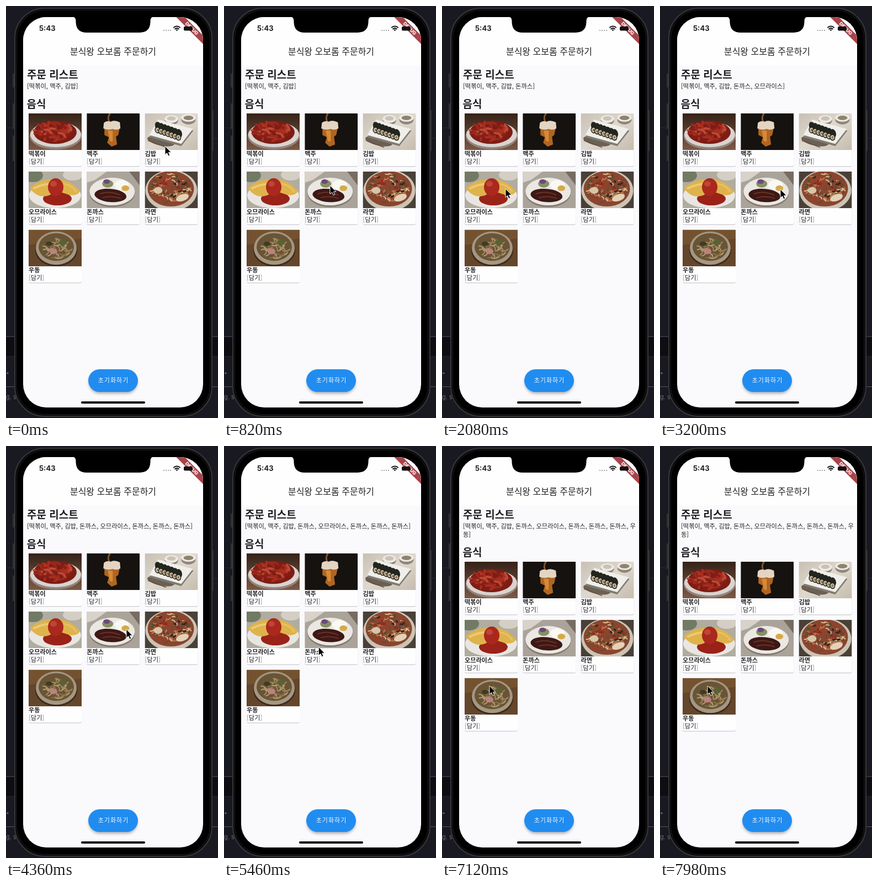
Recreate the animation shown at these times as an HTML page. Size 384 by 744 pixels, loop 8 s.

```html
<!DOCTYPE html>
<html lang="ko">
<head>
<meta charset="utf-8">
<title>주문하기</title>
<style>
  html, body { margin: 0; width: 100%; height: 100%; overflow: hidden; background: #191922; }
  svg { display: block; width: 100vw; height: 100vh; }
  text { font-family: "Noto Sans CJK KR", "Noto Sans CJK", "Noto Sans CJK JP", sans-serif; fill: #202024; white-space: pre; }
  .latin { font-family: Inter, Roboto, sans-serif; }
  .heading { font-size: 19px; font-weight: 700; }
  .body { font-size: 11.25px; }
  .name { font-size: 11.1px; font-weight: 700; }
  .bracket { fill: #8c8c90; }
</style>
</head>
<body>
<svg viewBox="0 0 384 744">
  <defs>
    <clipPath id="screen"><rect x="31" y="20" width="326" height="705" rx="42"/></clipPath>
    <clipPath id="photo"><rect width="96" height="66"/></clipPath>
    <filter id="soft" x="-30%" y="-30%" width="160%" height="180%"><feGaussianBlur stdDeviation="2.5"/></filter>
    <linearGradient id="linen" x2="1" y2="1"><stop stop-color="#c9c0b4"/><stop offset=".5" stop-color="#ded8ce"/><stop offset="1" stop-color="#c5bcad"/></linearGradient>
    <linearGradient id="wood" x2="0" y2="1"><stop stop-color="#352218"/><stop offset="1" stop-color="#7c5945"/></linearGradient>
  </defs>

  <!-- window behind the phone -->
  <rect width="384" height="744" fill="#191922"/>
  <path d="M0 597H384V633H0Z" fill="#0d0d12"/>
  <path d="M0 597H384M0 687.5H384" stroke="#55556c"/>
  <path d="M0 220H16M372 239H384M0 633H384" stroke="#2b2b38"/>
  <circle cx="3" cy="663" r="1.5" fill="#777785"/>
  <text class="latin" x="0" y="710" font-size="11" style="fill:#6b6b78">g. s</text>

  <!-- phone body -->
  <path d="M13.5 122V147M13.5 176V222M13.5 234V280M374.5 188V262" stroke="#303036" stroke-width="3"/>
  <rect x="16" y="4" width="357" height="737" rx="54" fill="#0a0a0b" stroke="#37373a" stroke-width="2"/>
  <rect x="19.5" y="7.5" width="350" height="730" rx="51" fill="#000" stroke="#1b1b1d"/>

  <g clip-path="url(#screen)">
    <path d="M31 20H357V725H31Z" fill="#fafafd"/>
    <path d="M31 20H357V107H31Z" fill="#fefeff"/>
    <text x="194" y="88" font-size="16" text-anchor="middle">분식왕 오보롬 주문하기</text>
    <text x="38" y="131" class="heading">주문 리스트</text>
    <text id="line1" x="38" y="148.5" class="body"></text>
    <text id="line2" x="38" y="163.5" class="body"></text>
    <g id="menu"><text x="37.5" y="184" class="heading">음식</text></g>

    <rect x="150" y="660" width="88" height="40" rx="20" fill="#555" opacity=".45" filter="url(#soft)"/>
    <rect x="149" y="656" width="90" height="41" rx="20.5" fill="#218cf0"/>
    <text x="194.5" y="680" font-size="11" letter-spacing="1" text-anchor="middle" style="fill:#f4f9ff">초기화하기</text>

    <g transform="translate(336.5 40.5) rotate(45)">
      <path d="M-40 -5.5H40V5.5H-40Z" fill="#a8434a"/>
      <text class="latin" y="3" font-size="8.5" font-weight="800" text-anchor="middle" style="fill:#fff">DEBUG</text>
    </g>
  </g>

  <!-- system chrome -->
  <path d="M120 19Q126.500 20 126.500 27V29Q127 48 146 48H242Q261 48 261.500 29V27Q261.500 20 268 19Z"/>
  <text class="latin" x="60" y="45.300" font-size="13" font-weight="700">5:43</text>
  <path d="M285 44H299" stroke="#a8a8ac" stroke-width="2" stroke-dasharray="2 2"/>
  <g fill="none" stroke="#111" stroke-width="2">
    <path d="M303.300 39.300Q309.500 33.800 315.700 39.300M305.600 41.900Q309.500 38.400 313.400 41.900"/>
    <path d="M308 43L309.500 44.800L311 43Z" fill="#111" stroke-width="1"/>
  </g>
  <rect x="322" y="37" width="16" height="7.500" rx="2" fill="#111"/>
  <rect x="136" y="714" width="116" height="4" rx="2"/>
  <path id="cursor" d="M0 0V15.500L3.600 12.300L6 17.800L8.700 16.600L6.300 11.300H11Z" stroke="#f4f4f4" stroke-width="1" stroke-linejoin="round"/>
</svg>

<script>
const LOOP = 8000;
const byId = id => document.getElementById(id);

const ellipse = (x, y, rx, ry, fill, angle = 0) =>
  `<ellipse cx="${x}" cy="${y}" rx="${rx}" ry="${ry}" fill="${fill}" transform="rotate(${angle} ${x} ${y})"/>`;
const shape = (d, fill) => `<path d="${d}" fill="${fill}"/>`;
const line = (d, color, width) =>
  `<path d="${d}" fill="none" stroke="${color}" stroke-width="${width}" stroke-linecap="round"/>`;
const backdrop = fill => shape('M0 0H96V66H0Z', fill);

// Short seeded strokes spread over an ellipse: noodles, rice cakes, garnish.
function scatter(count, seed, x, y, rx, ry, colors, width, length) {
  const random = () => (seed = seed * 16807 % 2147483647) / 2147483647;
  let out = '';
  for (let i = 0; i < count; i++) {
    const a = random() * 6.28, r = Math.sqrt(random()), turn = random() * 3.14;
    const px = x + Math.cos(a) * r * rx, py = y + Math.sin(a) * r * ry;
    const dx = Math.cos(turn) * length, dy = Math.sin(turn) * length * 0.6;
    out += line(`M${px - dx} ${py - dy}Q${px + dy} ${py - dx / 2} ${px + dx} ${py + dy}`, colors[i % colors.length], width);
  }
  return out;
}

function gimbapRolls() {
  let out = '';
  for (let i = 0; i < 7; i++) {
    const x = 24 + i * 6.3, y = 23 + i * 2.2;
    out += ellipse(x, y, 5.5, 8, '#23261f', -15) + ellipse(x - 1, y + 7, 5, 6, '#22261d', -15)
         + ellipse(x - 1, y + 7, 3.5, 4.2, '#cbc2ad', -15) + ellipse(x - 1, y + 7, 1.9, 2.3, '#9b7048');
  }
  return out;
}

const foods = [
  ['떡볶이', backdrop('url(#wood)') + ellipse(49, 41, 47, 24, '#93847b') + ellipse(49, 38, 46, 23, '#d9d3cf')
    + ellipse(48, 34, 39, 21, '#7c1d15')
    + scatter(38, 71, 47, 32, 31, 15, ['#a92e20', '#bd4935', '#871f17', '#99291c'], 4, 8)],
  ['맥주', backdrop('#15120f') + line('M42 0Q36 9 42 17', '#80552f', 3)
    + shape('M32 25H60L57 39L53 42L55 56L45 60L37 53L40 43L32 39Z', '#b06521')
    + shape('M38 31H47V51L42 50Z', '#d58b3a')
    + shape('M31 17Q36 12 43 15Q50 11 60 16L61 27Q54 31 47 28Q38 31 30 27Z', '#e4d5c2')],
  ['김밥', backdrop('url(#linen)') + ellipse(48, 13, 12, 8, '#8d8279') + ellipse(48, 10, 12, 7, '#eeeae4')
    + ellipse(48, 9, 8, 4, '#c9c2b6') + ellipse(79, 11, 13, 9, '#91867b') + ellipse(79, 8, 13, 7, '#eeeae4')
    + ellipse(79, 8, 9, 4, '#8d8470') + ellipse(29, 50, 25, 8, '#696156', 12)
    + shape('M8 43L24 14L88 31L66 59Z', '#827a70') + shape('M8 39L24 11L87 28L66 55Z', '#f0eeea')
    + gimbapRolls() + line('M6 49L38 61', '#6b4b38', 1.5)],
  ['오므라이스', backdrop('#b1aca0') + ellipse(8, 7, 18, 12, '#727a63') + ellipse(80, 6, 18, 10, '#d4cec4')
    + ellipse(48, 43, 47, 23, '#e9e6e2') + ellipse(52, 49, 26, 12, '#9a2218')
    + shape('M2 30Q19 14 45 14Q76 12 93 36Q85 47 67 40Q52 33 37 43Q17 50 2 30Z', '#dfb34b')
    + line('M10 30Q30 20 46 23', '#ecca74', 4) + line('M65 22Q79 25 86 36', '#e8c268', 3)
    + ellipse(49, 28, 14, 16, '#aa281d') + ellipse(45, 22, 6, 5, '#bd4636')],
  ['돈까스', backdrop('#aaa399') + shape('M0 0H36L15 15L0 20Z', '#d8d2ca') + shape('M77 0H96V25Z', '#786c62')
    + ellipse(46, 39, 41, 25, '#83796f') + ellipse(46, 36, 41, 25, '#ebe8e4') + ellipse(63, 24, 13, 9, '#faf8f3')
    + ellipse(70, 30, 7, 5, '#d5aa4a') + ellipse(38, 22, 10, 7, '#858f64') + ellipse(36, 18, 6, 4, '#6d4a79')
    + ellipse(43, 43, 29, 12, '#3d1815', 5) + line('M24 40Q40 34 60 42M29 47Q44 43 61 48', '#6c3225', 2)],
  ['라면', backdrop('#494038') + ellipse(48, 34, 47, 37, '#cdc3b4') + ellipse(47, 31, 42, 32, '#874630')
    + scatter(80, 29, 47, 30, 36, 27, ['#bd8356', '#d8bd95', '#a03d28', '#b47444', '#72442e'], 2, 4)
    + scatter(32, 83, 45, 25, 34, 21, ['#4a5131', '#922719', '#2f2921'], 3, 2)
    + ellipse(68, 47, 12, 6, '#e3d2b7', -20) + ellipse(24, 34, 8, 6, '#d8c5a8')],
  ['우동', backdrop('#64462b') + shape('M0 0H96V16L0 27Z', '#745230') + ellipse(50, 37, 38, 29, '#3e2b1c')
    + ellipse(50, 33, 37, 30, '#a59782') + ellipse(50, 31, 32, 25, '#695536')
    + scatter(34, 47, 50, 34, 23, 17, ['#a78e65', '#8c7349', '#bca67e'], 1.800, 7)
    + ellipse(45, 39, 7, 5, '#bd8180') + ellipse(62, 23, 7, 5, '#596236') + ellipse(37, 25, 6, 4, '#3d3c27')],
];

byId('menu').innerHTML += foods.map(([name, photo], i) => `
  <g transform="translate(${41 + i % 3 * 105.25} ${194 + Math.floor(i / 3) * 105.1})">
    <rect y="2" width="96" height="94.500" rx="3" fill="#d4d4d8"/>
    <rect width="96" height="95" rx="3" fill="#fefeff"/>
    <g clip-path="url(#photo)">${photo}</g>
    <text y="76.700" class="name">${name}</text>
    <text y="90.700" class="body"><tspan class="bracket">[</tspan>담기<tspan class="bracket">]</tspan></text>
  </g>`).join('');

const orders = [
  [0, '떡볶이'], [0, '맥주'], [0, '김밥'], [1200, '돈까스'], [2300, '오므라이스'],
  [3500, '돈까스'], [3800, '돈까스'], [4100, '돈까스'], [7100, '우동'],
];
const LINE_LENGTH = 42;

// Pointer moves: start, end, destination.
const moves = [
  [0, 0, 288, 253], [120, 720, 192, 324], [1350, 1950, 115, 330],
  [2500, 3100, 218, 331], [5100, 6000, 86, 421], [6500, 6900, 86, 433],
];

function pointerAt(time) {
  let [, , x, y] = moves[0];
  for (const [start, end, toX, toY] of moves.slice(1)) {
    const p = Math.min(1, Math.max(0, (time - start) / (end - start)));
    const eased = p * p * (3 - 2 * p);
    x += (toX - x) * eased;
    y += (toY - y) * eased;
  }
  return [x, y];
}

function render(now) {
  const time = now % LOOP;
  const list = `[${orders.filter(([at]) => at <= time).map(([, name]) => name).join(', ')}]`;
  byId('line1').textContent = list.slice(0, LINE_LENGTH);
  byId('line2').textContent = list.slice(LINE_LENGTH);
  byId('menu').setAttribute('transform', `translate(0 ${list.length > LINE_LENGTH ? 15 : 0})`);
  byId('cursor').setAttribute('transform', `translate(${pointerAt(time)})`);
  requestAnimationFrame(render);
}
render(performance.now());
</script>
</body>
</html>
```
